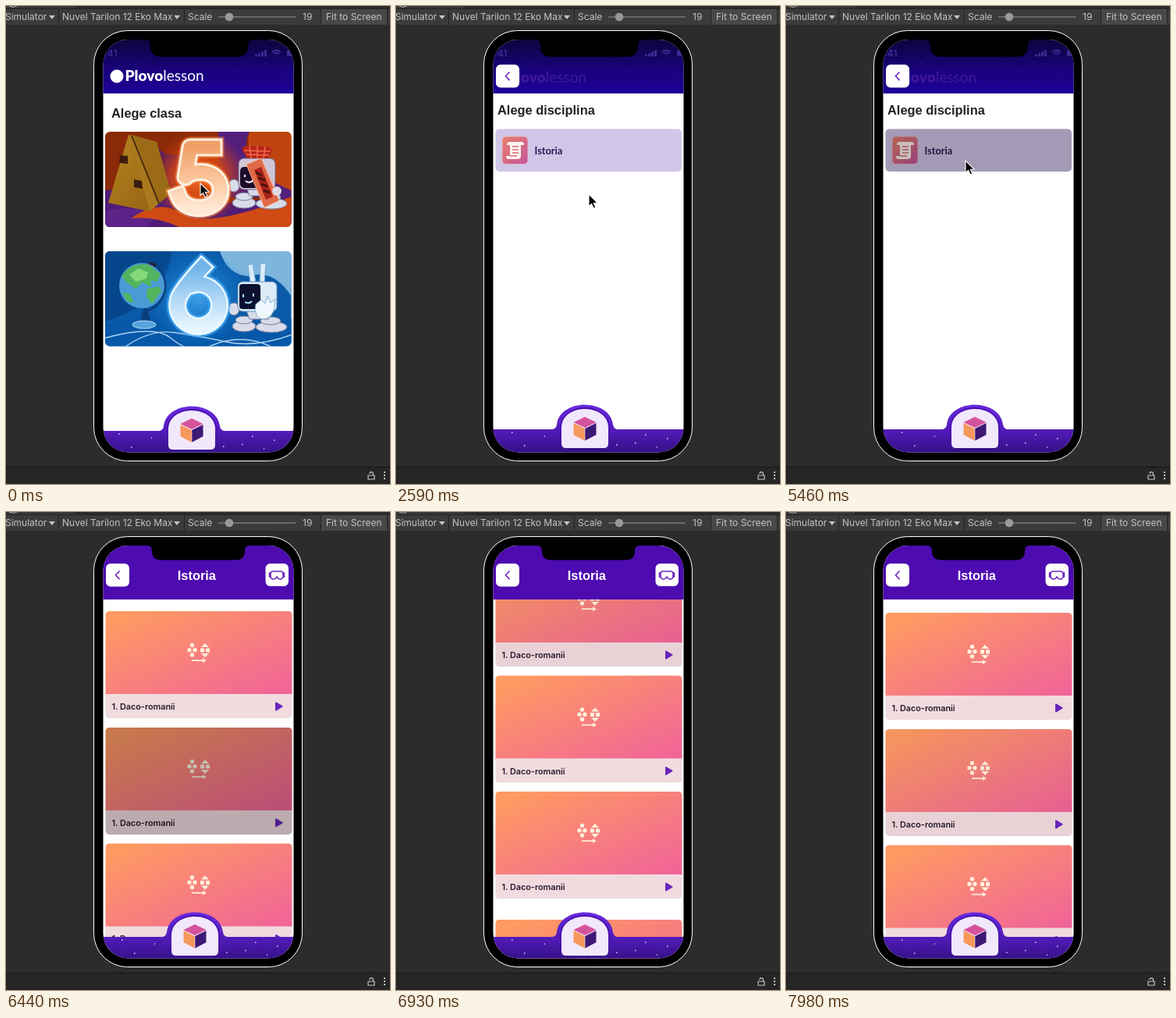
Write an HTML page that moves like this. It is 492 px wide and 612 px high and loops after 8000 ms.

```html
<!DOCTYPE html>
<html lang="ro">
<head>
<meta charset="utf-8">
<title>Simulator</title>
<style>
  html, body { margin: 0; width: 100%; height: 100%; overflow: hidden; background: #2c2c2c; }
  svg { display: block; }
  .ui { font: 12px Inter, sans-serif; fill: #c4c4c4; }
  .title { font: bold 16.4px "Liberation Sans", Arial, sans-serif; fill: #222; }
  .brand { font: 19px Lato, sans-serif; fill: #fff; }
  .brand tspan { font-weight: 900; }
  .lesson { font: 600 10.8px Inter, sans-serif; fill: #241a2c; }
  .row { font: bold 12.8px Lato, sans-serif; fill: #2a1850; }
</style>
</head>
<body>
<svg width="492" height="612" viewBox="0 0 492 612">
  <defs>
    <clipPath id="screen"><rect x="124.5" y="43" width="244" height="528.5" rx="32"/></clipPath>
    <clipPath id="card5"><rect x="127" y="161" width="238.5" height="122" rx="6"/></clipPath>
    <clipPath id="card6"><rect x="127" y="314" width="238.5" height="121.5" rx="6"/></clipPath>
    <linearGradient id="night" x2="0" y2="1"><stop stop-color="#0d043c"/><stop offset=".6" stop-color="#1a027f"/><stop offset="1" stop-color="#1f0099"/></linearGradient>
    <linearGradient id="violet" gradientUnits="userSpaceOnUse" x1="0" y1="-32" x2="0" y2="28"><stop stop-color="#6a2be0"/><stop offset=".55" stop-color="#521bb8"/><stop offset="1" stop-color="#36118a"/></linearGradient>
    <linearGradient id="sunset" x2="1" y2="1"><stop offset=".08" stop-color="#ff9a62"/><stop offset="1" stop-color="#f0629a"/></linearGradient>
    <linearGradient id="badge" x2="1" y2="1"><stop stop-color="#e9806a"/><stop offset="1" stop-color="#c3549e"/></linearGradient>
    <linearGradient id="fire" x2="0" y2="1"><stop stop-color="#f0a068"/><stop offset=".5" stop-color="#fbc49a"/><stop offset="1" stop-color="#ffe8d2"/></linearGradient>
    <linearGradient id="ice" x2="0" y2="1"><stop stop-color="#70b4ea"/><stop offset=".5" stop-color="#add6f7"/><stop offset="1" stop-color="#e6f5ff"/></linearGradient>
    <linearGradient id="tent" x2="1" y2="1"><stop stop-color="#b8841f"/><stop offset="1" stop-color="#8f6012"/></linearGradient>
    <radialGradient id="ember"><stop stop-color="#f0661f"/><stop offset=".55" stop-color="#d8480f" stop-opacity=".8"/><stop offset="1" stop-color="#c03a0c" stop-opacity="0"/></radialGradient>
    <radialGradient id="frost"><stop stop-color="#3f9fe6"/><stop offset="1" stop-color="#1080dd" stop-opacity="0"/></radialGradient>

    <path id="five" d="M266 181H236L230 219C240 208 275 209 275 236C275 263 230 267 221 243"/>
    <path id="six" d="M251 335Q231 357 225 367A27 27 0 1 0 240 357"/>

    <g id="feet" fill="#d8dcea" stroke="#777c99">
      <ellipse cx="305" cy="252" rx="15" ry="7"/><ellipse cx="340" cy="253" rx="20" ry="7"/>
      <ellipse cx="305" cy="244" rx="11" ry="5"/><ellipse cx="339" cy="245" rx="13" ry="5"/>
      <path d="M308 232H340L336 243H312z"/>
      <ellipse cx="292" cy="230" rx="7" ry="8"/>
    </g>

    <g id="lesson">
      <path d="M127.500 107V5q0-5 5-5H361.500q5 0 5 5V107z" fill="url(#sunset)"/>
      <path d="M127.500 106H366.500V132q0 5-5 5H132.500q-5 0-5-5z" fill="#f1dbdf"/>
      <g fill="#fff0dc">
        <circle cx="238.500" cy="43.500" r="2.700"/><circle cx="235" cy="49.800" r="2.700"/>
        <circle cx="242" cy="49.800" r="2.700"/><circle cx="238.500" cy="56" r="2.700"/>
        <path d="M255 41l5 5h-10zM249 47.500h5v5h-5zM256 47.500h5v5h-5zM250 54h10l-5 5z"/>
        <path d="M238 62.300h14v-2l5 2.900-5 2.900v-2h-14z"/>
      </g>
      <text class="lesson" x="135.500" y="126">1. Daco-romanii</text>
      <path d="M346 117.500l7.500 4.500-7.500 4.500z" fill="#6a26bd" stroke="#6a26bd" stroke-width="2" stroke-linejoin="round"/>
    </g>

    <g id="back">
      <rect x="128" width="30" height="29.500" rx="6" fill="#fff"/>
      <path d="M145.500 9.500l-5 5.300 5 5.300" fill="none" stroke="#6a26bd" stroke-width="1.600"/>
    </g>
  </defs>

  <rect width="492" height="612" fill="#2c2c2c"/>
  <path d="M0 3.500H492V24H0z" fill="#3b3b3b"/>
  <path d="M0 0H88V3H0z" fill="#383838"/>
  <path d="M0 3.500H492M67.500 4V24M228.500 4V24M403.500 4V24M488.500 4V24" stroke="#232323"/>
  <path d="M404 4H488V24H404z" fill="#484848"/>
  <path d="M4 0q5 3 10 0" fill="none" stroke="#aaa"/>
  <g class="ui">
    <text x="-1" y="18">Simulator</text>
    <path d="M55 12h8l-4 5zM215 12h8l-4 5z"/>
    <text x="72" y="18">Nuvel Tarilon 12 Eko Max</text>
    <text x="233" y="18">Scale</text>
    <text x="380" y="18">19</text>
    <text x="410" y="18">Fit to Screen</text>
  </g>
  <path d="M272 14H371" stroke="#696969" stroke-width="2"/>
  <circle cx="286" cy="14" r="5.300" fill="#999"/>
  <path d="M0 591H492V612H0z" fill="#262626"/>
  <path d="M0 590.500H492" stroke="#1c1c1c" stroke-width="2"/>
  <path d="M464 601h8v5h-8zM470.500 601v-2a2.300 2.300 0 0 0-4.600 0" fill="none" stroke="#c4c4c4" stroke-width="1.200"/>
  <path d="M484 596h2v2h-2zM484 600h2v2h-2zM484 604h2v2h-2z" fill="#c4c4c4"/>

  <rect x="112.500" y="31.500" width="267" height="551" rx="43" fill="#000" stroke="#fff"/>

  <g clip-path="url(#screen)">
    <rect x="124" y="43" width="246" height="529" fill="#fff"/>

    <g id="home">
      <text class="title" x="135" y="143">Alege clasa</text>

      <g clip-path="url(#card5)">
        <rect x="127" y="161" width="239" height="122" fill="#8a2a08"/>
        <path d="M192 176Q200 196 228 188V240H205z" fill="#4d1a62"/>
        <path d="M272 161H312Q300 184 322 205T366 236V245H272z" fill="#54207c"/>
        <path d="M312 161H366V236Q338 226 322 205T312 161z" fill="#bf4510"/>
        <path d="M127 236Q200 226 250 256L366 244V283H127z" fill="#4f1c78"/>
        <path d="M127 262Q165 254 196 268L178 283H127z" fill="#5d2388"/>
        <path d="M160 272Q196 246 226 266T366 244V283H222Q190 268 160 272z" fill="#cf4a14"/>
        <ellipse cx="247" cy="220" rx="62" ry="60" fill="url(#ember)"/>
        <path d="M157 165L131 252 184 263 210 240 193 174z" fill="url(#tent)"/>
        <path d="M161 165L193 174 212 240 194 254z" fill="#9c6b17"/>
        <path d="M158 165L163 166 196 253 184 263z" fill="#a97a1d"/>
        <path d="M161 166L196 253" stroke="#4a2a0c" stroke-width="2"/>
        <path d="M146 191l10 1v10l-11-1zM164 222l10 2 1 10-11-2z" fill="#3c1c0c"/>
        <use href="#feet"/>
        <rect x="298" y="195" width="47" height="40" rx="7" fill="#cfc6d6" stroke="#6f6284"/>
        <rect x="300" y="206" width="25" height="27" rx="5" fill="#1c0d2c"/>
        <path d="M306 216v3M316 215v3M307 224q5 4 10-1" fill="none" stroke="#fff" stroke-width="2"/>
        <path d="M302 183l5-4 30 1 5 5-6 10H309z" fill="#b82618"/>
        <path d="M305 185l34 1M308 190l29 1M312 179l2 16M322 179v16M332 180l-2 15" stroke="#f06a4a" stroke-width="1.500"/>
        <path d="M308 203l19-8 23 54-19 9z" fill="#e06848" stroke="#ffad8c"/>
        <path d="M318 210l9-4 15 38-9 4z" fill="#a82118"/>
        <path d="M320 213l8 4M323 220l9 3M327 228l8 3M330 236l8 3" stroke="#48120e" stroke-width="3"/>
        <circle cx="347" cy="237" r="6" fill="#ddd8e4"/>
        <g fill="none" stroke-linejoin="round" stroke-linecap="square">
          <use href="#five" stroke="#ff8a48" stroke-opacity=".55" stroke-width="27"/>
          <use href="#five" stroke="#fff0e0" stroke-width="23"/>
          <use href="#five" stroke="url(#fire)" stroke-width="17"/>
        </g>
        <rect id="tint5" x="127" y="161" width="239" height="122"/>
      </g>

      <g clip-path="url(#card6)">
        <rect x="127" y="314" width="239" height="122" fill="#0a5aa8"/>
        <path d="M127 314H212Q206 380 127 404z" fill="#06468c"/>
        <path d="M274 314H366V372Q342 336 312 346Q284 345 274 314z" fill="#7db5df"/>
        <path d="M127 408Q240 384 366 400V436H127z" fill="#0758a8"/>
        <ellipse cx="246" cy="374" rx="66" ry="62" fill="url(#frost)"/>
        <path d="M180 333l4-5 8 2v8z" fill="#2a2230"/>
        <path d="M194 335A33 33 0 0 1 177 391" fill="none" stroke="#0a3f7c" stroke-width="3"/>
        <path d="M176 387l-4 18h13l-4-18z" fill="#0a3f7c"/>
        <ellipse cx="177" cy="408" rx="15" ry="5" fill="#58a2dc" stroke="#b6dcf5"/>
        <circle cx="174" cy="358" r="29" fill="#4a9ad6"/>
        <path d="M148 346Q160 328 182 331L198 343 193 354 186 350 186 360 175 354 166 362 155 354zM181 362l15-3 3 6-12 17-7-10zM149 366l10 3 5 11-9-2z" fill="#52b45e"/>
        <path d="M158 344l12-8 12 5-2 8-14 4z" fill="#86d87a"/>
        <path d="M127 425Q190 408 211 425T240 436M153 436Q185 414 215 418T282 430 366 421M260 436Q300 418 340 436" fill="none" stroke="#a9d2f0" stroke-width="1.400"/>
        <use href="#feet" y="158"/>
        <path d="M310 332l6-2 4 24h-7zM326 330l7-1-2 26h-6z" fill="#d9ecfa" stroke="#7aaad0"/>
        <rect x="297" y="353" width="50" height="38" rx="6" fill="#dcecf8" stroke="#5f8fb8"/>
        <rect x="299" y="356" width="27" height="32" rx="4" fill="#0b1030"/>
        <path d="M304 369v4M317 368v4M306 379q5 3 9-1" fill="none" stroke="#a8e4ff" stroke-width="2"/>
        <path d="M320 382l7-6 5 5 3-10 4 9 6-5-1 10q-2 15-15 16-12-2-9-19z" fill="#f0f7fd" stroke="#86aed0"/>
        <g fill="none" stroke-linejoin="round" stroke-linecap="square">
          <use href="#six" stroke="#49b5ff" stroke-opacity=".6" stroke-width="28"/>
          <use href="#six" stroke="#eaf8ff" stroke-width="23"/>
          <use href="#six" stroke="url(#ice)" stroke-width="18"/>
        </g>
      </g>
    </g>

    <g id="subjects">
      <text class="title" x="130" y="139">Alege disciplina</text>
      <rect x="127.500" y="157.500" width="238.500" height="54.500" rx="5" fill="#d1c6e8"/>
      <rect x="136" y="167" width="33" height="35.500" rx="5" fill="url(#badge)" stroke="#e9b9c4"/>
      <path d="M146 174h15q3 0 3 4h-4v14q0 4-4 4h-12q-3 0-3-4h5v-14h-4q0-4 4-4z" fill="#fff3ee"/>
      <path d="M149 180h8M149 184h8M149 188h8M146 192h9" stroke="#d76a7e" stroke-width="1.500"/>
      <text class="row" x="177.500" y="190">Istoria</text>
      <rect id="tintRow" x="127.500" y="157.500" width="238.500" height="54.500" rx="5"/>
    </g>

    <g id="dark">
      <rect x="124" y="43" width="246" height="69" fill="url(#night)"/>
      <path d="M180 43Q185 44 185 51Q185 65 199 65H296Q310 65 310 51Q310 44 315 43z" fill="#000"/>
      <g fill="#3a2c92">
        <text x="126" y="64.500" style="font:600 12px Inter,sans-serif">:41</text>
        <path d="M319 62h3v2.500h-3zM323 60.500h3v4h-3zM327 58.500h3v6h-3zM331 56.500h3v8h-3zM360 57h9v7h-9z"/>
      </g>
      <path d="M341 59q5.500-4.500 11 0M343 61.500q3.500-3 7 0M345.500 64h2" fill="none" stroke="#3a2c92" stroke-width="1.700"/>
      <path d="M172 73h1M296 82h1M333 74h1M354 92h1M279 69h1M317 101h1" stroke="#4a3ab0"/>
      <g id="brand">
        <circle cx="142" cy="90" r="8.500" fill="#fff"/>
        <text class="brand" x="152.500" y="96"><tspan>Plovo</tspan>lesson</text>
      </g>
      <g id="ghost">
        <text class="brand" x="143" y="97.500" style="fill:#40179f"><tspan>Plovo</tspan>lesson</text>
        <use href="#back" y="75"/>
      </g>
    </g>

    <g id="lessons">
      <g id="list">
        <use href="#lesson" y="129"/>
        <use href="#lesson" y="278"/>
        <rect id="tintLesson" x="127.500" y="278" width="239" height="137" rx="5"/>
        <use href="#lesson" y="426.500"/>
        <use href="#lesson" y="575"/>
        <use href="#lesson" y="739"/>
      </g>
      <rect x="124" y="43" width="246" height="69" fill="#4d0bb0"/>
      <path d="M182 43Q187 44 187 50Q187 61.500 199 61.500H294Q306 61.500 306 50Q306 44 311 43z" fill="#000"/>
      <use href="#back" y="66"/>
      <text class="title" x="219.800" y="87" style="fill:#fff">Istoria</text>
      <rect x="332.500" y="66" width="29.500" height="29" rx="6" fill="#fff"/>
      <path d="M342 76h10q3 0 3 3v3q0 4-4 4-2 0-4-3-2 3-4 3-4 0-4-4v-3q0-3 3-3zM339 78h-1.500v5h1.500M355 78h1.500v5h-1.500" fill="none" stroke="#6a26bd" stroke-width="1.500"/>
    </g>

    <g id="tab">
      <path d="M-122 0H-43Q-37 0-36-6C-32-40 32-40 36-6Q37 0 43 0H140V30H-122z" fill="url(#violet)"/>
      <path d="M-32 2C-32-37 32-37 32 2" fill="none" stroke="#4a12b4" stroke-width="2"/>
      <path d="M-30 18V-2C-30-34 30-34 30-2V18q0 6-6 6H-24q-6 0-6-6z" fill="#f2e8fc"/>
      <path d="M0-16L14.500-9 0-2-14.500-9z" fill="#d5539c"/>
      <path d="M-14.500-8L-.3-1V14.500L-14.500 7z" fill="#f7985c"/>
      <path d="M14.500-8L.3-1V14.500L14.500 7z" fill="#3d1874"/>
      <path d="M-78 21h1.500M-94 4h1.500M40 20h1.500M64 17.500h1.500M77 7h1.500M105 12h1.500M-52 9h1M92 23h1" stroke="#e5d4ff" stroke-width="1.500"/>
    </g>
  </g>

  <path id="cursor" d="M0 0V15.500L3.600 12.300 6.100 18 8.800 16.800 6.300 11.200H11.200z" fill="#000" stroke="#fff" stroke-width="1.100"/>
</svg>

<script>
const LOOP = 8000, STEP = 70, DRAG = -217;
const $ = id => document.getElementById(id);
const clamp = x => Math.min(1, Math.max(0, x));
const show = (id, on) => $(id).setAttribute("display", on ? "inline" : "none");
const move = (id, x, y) => $(id).setAttribute("transform", `translate(${x} ${y})`);
const tint = (id, amount) => $(id).setAttribute("opacity", amount);

// [from, until, x, y]
const pointer = [
  [0, 1400, 249, 227],
  [2380, 3010, 247, 241],
  [3780, 3850, 193, 184],
  [3850, 5950, 230, 198]
];

// Drag up with a soft start and stop, then spring back exponentially.
function scrollAt(t) {
  if (t > 7000) return DRAG * Math.exp((7000 - t) / 129.6);
  const p = clamp((t - 6410) / 520);
  return DRAG * p * p * (3 - 2 * p);
}

function lessonTint(t) {
  const press = 0.22 * clamp((t - 6230) / 140);
  const release = 0.18 * clamp((t - 6440) / 140);
  return press - release;
}

function draw() {
  const t = Math.floor(performance.now() % LOOP / STEP) * STEP;
  const page = t < 2590 ? 1 : t < 5530 ? 2 : 3;

  show("home", page === 1);
  show("brand", page === 1);
  show("subjects", page === 2);
  show("ghost", page === 2);
  show("dark", page < 3);
  show("lessons", page === 3);
  move("tab", page === 1 ? 238 : 242, page === 2 ? 542 : 544);

  tint("tint5", t >= 2520 ? 0.22 : 0.04 * clamp((t - 490) / 140));
  tint("tintRow", t >= 5460 ? 0.22 : 0.04 * clamp((t - 3220) / 140));
  tint("tintLesson", lessonTint(t));
  move("list", 0, scrollAt(t));

  const spot = pointer.find(([from, until]) => t >= from && t < until);
  show("cursor", spot);
  if (spot) move("cursor", spot[2], spot[3]);

  requestAnimationFrame(draw);
}
draw();
</script>
</body>
</html>
```
